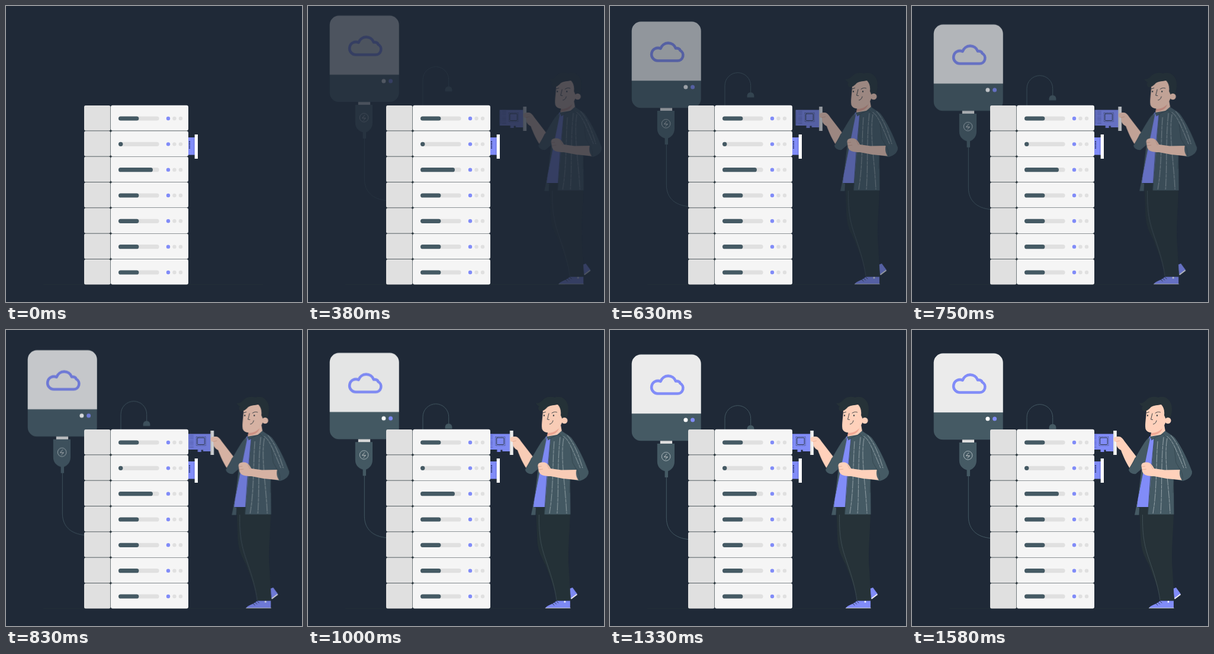
An HTML page that plays this animation: 500 by 500 pixels, repeating every 1.62 s.

```html
<!DOCTYPE html>
<html lang="en">
<head>
<meta charset="utf-8">
<title>Server stack</title>
<style>
  html, body { margin: 0; width: 100%; height: 100%; overflow: hidden; background: #1f2937; }
  svg { display: block; width: 100vw; height: 100vh; }
  .slide { animation: slide 1620ms infinite, show 1620ms step-end infinite; }
  .down { --from: translate(0, -30px); }
  .left { --from: translate(30px, 0); }
  @keyframes slide {
    0% { opacity: 0; transform: var(--from); animation-timing-function: cubic-bezier(.36, -.01, .5, 1.38); }
    94.44%, 100% { opacity: 1; transform: none; }
  }
  @keyframes show {
    0% { visibility: hidden; }
    12.9%, 100% { visibility: visible; }
  }
  .slate { fill: #455a64; }
  .ink { fill: #263238; }
  .accent { fill: #818cf8; }
  .skin { fill: #ffd1bb; }
  .pale { fill: #e0e0e0; }
  .white { fill: #f5f5f5; }
  .line { fill: none; stroke: #263238; stroke-width: .9; stroke-linecap: round; stroke-linejoin: round; }
  .fold { fill: none; stroke: #33444d; stroke-width: .8; }
  .crease { fill: none; stroke: #d99b84; stroke-width: .6; }
  .wire { fill: none; stroke: #455a64; stroke-width: 1; }
  .stripe { fill: none; stroke: #c3ccd0; stroke-width: .65; stroke-dasharray: 14 1 6 1; }
</style>
</head>
<body>
<svg viewBox="0 0 500 500">
  <defs>
    <g id="unit">
      <rect class="pale" x="132" y="167.9" width="44.4" height="42.6" rx="2.5"/>
      <rect class="white" x="177" y="167.8" width="131" height="42.8" rx="3"/>
      <rect class="pale" x="190" y="186.4" width="68.6" height="7.2" rx="3.6"/>
      <circle class="accent" cx="274" cy="190" r="3.2"/>
      <circle class="pale" cx="284.5" cy="190" r="3.2"/>
      <circle class="pale" cx="295" cy="190" r="3.2"/>
    </g>
  </defs>

  <path d="M63 470.3H434" stroke="#263238" stroke-width=".5"/>

  <!-- cloud drive and cables -->
  <g class="slide down">
    <path class="wire" d="M95.3 245V315C95.3 338 111 352 140 352"/>
    <path class="wire" d="M194 205V147.500A21.850 21.850 0 0 1 237.700 147.500V160"/>
    <path class="slate" d="M231.600 167.500V164A6 6 0 0 1 243.400 164V167.500Z"/>
    <rect class="slate" x="36.700" y="39.600" width="117" height="145.700" rx="15.500"/>
    <path fill="#ebebeb" d="M36.700 139.300V55.100A15.500 15.500 0 0 1 52.200 39.600H138.200A15.500 15.500 0 0 1 153.700 55.100V139.300Z"/>
    <path fill="none" stroke="#818cf8" stroke-width="4.600" stroke-linejoin="round"
      d="M81 105.500A10.800 10.800 0 1 1 85.500 84.900A13.500 13.500 0 0 1 111 84.500C115 84 118 85.500 118.500 88A9.300 9.300 0 0 1 114 105.500Z"/>
    <circle fill="#fff" cx="127.900" cy="150.100" r="3.500"/>
    <circle class="accent" cx="139.600" cy="150.100" r="3.500"/>
    <rect class="pale" x="84.800" y="185.300" width="20.300" height="4.700"/>
    <path class="slate" d="M79.800 190H109V220C109 229 104 234 98 236.500V247H92.600V236.500C85 234 79.800 229 79.800 220Z"/>
    <circle cx="94.600" cy="211.800" r="7.300" fill="none" stroke="#c5ced2" stroke-width=".8"/>
    <path d="M96 207.300L91.500 212.500H97.500L93.500 216.300" fill="none" stroke="#e0e0e0" stroke-width=".8"/>
  </g>

  <!-- technician with card -->
  <g class="slide left">
    <path class="accent" d="M300.500 175.500H341V205H327.500V202.500H324.500V206H318.500V202H300.500Z"/>
    <path d="M302.500 178.500V199" stroke="#4b55a5" stroke-width="1" stroke-dasharray="1 1.300"/>
    <path d="M308 177.500V200" stroke="#5660b8" stroke-width="7" stroke-dasharray=".7 1.600"/>
    <rect class="line" x="317.700" y="182" width="12.500" height="11.500" rx="1"/>
    <rect class="line" x="316" y="180.300" width="16" height="15" stroke-dasharray="1 1.500" style="stroke-linecap:butt"/>
    <rect class="white" x="340.200" y="170" width="5.600" height="41"/>
    <path class="pale" d="M340.200 170H342V211H340.200Z"/>

    <path class="accent" d="M441 437L446 435L454 446L443 454Z"/>
    <path d="M453.500 446.500L443.500 454" stroke="#f5f5f5" stroke-width="1.800"/>
    <path class="ink" d="M384 296L442 304C442 338 437 375 440 405L443 457.500H419.500C418 440 408 418 400 396C389 376 387 368 386 350Z"/>
    <path d="M389.500 312C389 350 393 366 402 392S416 436 419 456" fill="none" stroke="#52636b" stroke-width=".6"/>
    <path class="accent" d="M419 457.500H442V469.500H400.500C402 465 412 464 419 457.500Z"/>
    <path d="M400 469.700H442.500" stroke="#f5f5f5" stroke-width=".8"/>
    <path class="line" d="M412 462L415 465M415.500 460L418.500 463M419 458L422 461"/>
    <circle fill="#fff" cx="433" cy="459" r="1.500"/>

    <path class="skin" d="M340.500 184C341 180 347 179.500 352 180.500C355 182 357 185 359 188L379 214L370 237C363 227 357 214 353 203C347 200 345 196 345 189C342 189 340.500 187 340.500 184Z"/>
    <path class="crease" d="M345 188.500L351 187"/>
    <path class="slate" d="M403 179C393 186 386 202 377 216L366 236C367 241 373 244 378 243L391 232Z"/>
    <path class="fold" d="M377 216C374 224 370 229 366.500 235"/>
    <path class="accent" d="M401 180L412 176L412 240L400 299H379Z"/>
    <path class="slate" d="M403 179C396 194 391 208 389 224L380 299L384 300L383.500 312.500H376Z"/>
    <path class="slate" d="M409 182L427 170C434 175 439 177 444 182C455 196 466 220 473 239C474 246 466 253 457 255L442 252L442.500 311.500H398.500Z"/>
    <path class="fold" d="M409 183L403 245L398.500 311M443 199L446 224L453 236M442 251L441 275"/>
    <path class="stripe" d="M415 188C412 225 414 270 407 310M425 181C420 225 423 270 420 310M431 183C425 215 434 262 436 310"/>
    <path class="stripe" d="M428 178C440 184 444 198 462 240M437 178C450 192 459 218 467 247"/>

    <path class="skin" d="M455 236L427 236.500L409 234C406 228 403 224 397 223.500C391 223 387 225 387.500 230L389 239C391 245 397 247 409 247L430 251L456 253.500Z"/>
    <path class="crease" d="M388 231L394 230M389 236L396 235M403 227L407 235"/>
    <path class="slate" d="M453 235C460 233 467 232 472 237C475 246 467 253 457 255C452 249 451 242 453 235Z"/>
    <path class="fold" d="M453 235C457 242 458 249 457 255"/>

    <path class="skin" d="M403 180L405 168L426 160L428 171C422 178 412 181 403 182Z"/>
    <path fill="#f2a995" d="M404 174C412 174 418 171 423 166C421 174 413 178 403.500 178Z"/>
    <path class="skin" d="M396 132C396 148 393 158 394.500 167C397 174 406 174.500 413 172C421 169 425 164 428 157L430 122L408 122Z"/>
    <path class="ink" d="M384 123C389 125 393 121 397 117C403 112 410 112 416 114C424 111 431 114 435 120C440 126 440 138 436.500 148L429 151L426 144C427 136 425 130 421 126C415 127 409 127 404 130C400 134 396 138 391 137C387 134 388 130 390 129C387 128 385 126 384 123Z"/>
    <circle class="skin" cx="432.300" cy="153" r="5.300"/>
    <path class="line" d="M396 140L400.500 138.500M411 140.500C414 138 417 138 419.500 139M406 141L403.500 151L406.500 151.500M407.500 159C410 159 412.500 156 413 153"/>
    <ellipse class="ink" cx="398" cy="144.500" rx="1" ry="1.400"/>
    <ellipse class="ink" cx="414" cy="144.500" rx="1" ry="1.400"/>
    <path class="slate" d="M402 180L404.500 186L412 181L425 176L431 181L428 170L420 177Z"/>
    <path class="fold" d="M404.500 186L412 181L424 176L430 182"/>
  </g>

  <!-- server stack -->
  <rect class="accent" x="306" y="222" width="13" height="29.500"/>
  <path d="M310 228V241" stroke="#39437f" stroke-width="2.200" stroke-dasharray="2 .8"/>
  <path d="M317.800 223V251" stroke="#5e68cf" stroke-width=".8"/>
  <rect fill="#fff" x="318.700" y="217" width="5.300" height="41"/>
  <rect class="ink" x="132.500" y="169" width="174.500" height="300"/>
  <g id="stack"></g>
</svg>
<script>
  const ns = 'http://www.w3.org/2000/svg';
  const stack = document.getElementById('stack');
  const loads = [34.4, 7.4, 58, 34.4, 34.4, 34.4, 34.4];
  const pitch = 43.33;

  function add(tag, attrs) {
    const el = document.createElementNS(ns, tag);
    for (const key in attrs) el.setAttribute(key, attrs[key]);
    stack.append(el);
  }

  loads.forEach((width, i) => {
    const y = i * pitch;
    add('use', { href: '#unit', y });
    add('rect', { class: 'slate', x: 190, y: 186.4 + y, width, height: 7.2, rx: 3.6 });
  });
</script>
</body>
</html>
```
